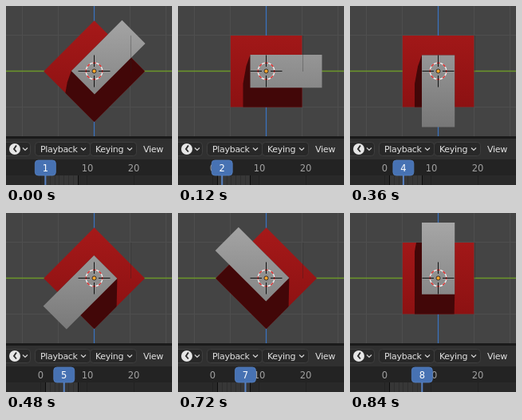
These frames come from a looping animation (208 px wide and 224 px high, 0.96 s). An HTML page:

```html
<!DOCTYPE html>
<html lang="en">
<head>
<meta charset="utf-8">
<title>Turning block</title>
<style>
html, body { margin: 0; width: 100%; height: 100%; overflow: hidden; background: #444; }
svg { display: block; width: 208px; height: 224px; }
text { font-family: "DejaVu Sans", sans-serif; font-size: 11.5px; fill: #a0a0a0; text-anchor: middle; }
.menu text { font-size: 11px; letter-spacing: -.3px; fill: #e2e2e2; text-anchor: start; }
</style>
</head>
<body>
<svg viewBox="0 0 208 224">
  <defs>
    <linearGradient id="red" gradientUnits="userSpaceOnUse" x1="0" y1="18" x2="0" y2="145">
      <stop stop-color="#a61919"/><stop offset="1" stop-color="#881011"/>
    </linearGradient>
    <linearGradient id="gray" gradientUnits="userSpaceOnUse" x1="0" y1="12" x2="0" y2="152">
      <stop stop-color="#a6a6a6"/><stop offset="1" stop-color="#777"/>
    </linearGradient>
    <clipPath id="face"><polygon id="faceClip"/></clipPath>
    <filter id="soft"><feGaussianBlur stdDeviation=".7"/></filter>
  </defs>

  <rect width="208" height="164" fill="#444"/>
  <path d="M20.5 0V163M65.5 0V163M155.5 0V163M200.5 0V163M0 36.5H208M0 126.5H208" stroke="#4e4e4e"/>
  <path d="M0 81.5H208" stroke="#6c962a" stroke-width="1.3"/>
  <path d="M110.5 0V163" stroke="#3b72bd" stroke-width="1.3"/>

  <polygon id="square" fill="url(#red)"/>
  <g clip-path="url(#face)"><polygon id="shadow" fill="#420708" filter="url(#soft)"/></g>
  <polygon id="bar" fill="url(#gray)"/>
  <path d="M156.5 37V82" stroke="#222" stroke-opacity=".3"/>

  <g fill="none">
    <circle cx="110.5" cy="81.5" r="10.3" stroke="#eee" stroke-width="1.3"/>
    <circle cx="110.5" cy="81.5" r="10.3" stroke="#d22" stroke-width="1.3" stroke-dasharray="4.045" stroke-dashoffset="2"/>
    <path d="M90.5 81.5H105M116 81.5H130.5M110.5 61.5V76M110.5 87V101.5" stroke="#111"/>
    <circle cx="110.5" cy="81.5" r="2.5" fill="#ffa52a" stroke="#222" stroke-width=".9"/>
  </g>

  <rect y="163" width="208" height="61" fill="#1a1a1a"/>
  <rect y="166" width="208" height="26" fill="#303030"/>
  <g class="menu">
    <g fill="#282828" stroke="#3e3e3e">
      <rect x="-6.5" y="170.5" width="37" height="17" rx="4"/>
      <rect x="36.5" y="170.5" width="69" height="17" rx="4"/>
      <rect x="105.5" y="170.5" width="58" height="17" rx="4"/>
    </g>
    <circle cx="11" cy="179" r="7" fill="#e6e6e6"/>
    <path d="M13 174.5L10 179L13 182.5" fill="none" stroke="#282828" stroke-width="1.8"/>
    <path id="chevrons" fill="none" stroke="#d0d0d0" stroke-width="1.2"/>
    <text x="43" y="183">Playback</text>
    <text x="112" y="183">Keying</text>
    <text x="172" y="183">View</text>
  </g>

  <rect y="192" width="208" height="32" fill="#232323"/>
  <rect y="212" width="208" height="12" fill="#292929"/>
  <rect x="50" y="212" width="40" height="12" fill="#373737"/>
  <path id="ticks" stroke="#222" stroke-opacity=".35"/>
  <path d="M43.5 212V224M101.5 212V224M160.5 212V224" stroke="#222"/>
  <path d="M49.5 212V224M90.5 212V224" stroke="#0c0c0c"/>
  <text x="43.5" y="207">0</text>
  <text x="102" y="207">10</text>
  <text x="160" y="207">20</text>
  <g id="playhead">
    <path d="M0 211V224" stroke="#5680c2" stroke-width="2"/>
    <rect x="-13" y="193" width="26" height="19" rx="4" fill="#4772b3" stroke="#5680c2" stroke-width=".8"/>
    <text id="count" y="207" style="fill:#fff"></text>
  </g>
</svg>
<script>
const $ = id => document.getElementById(id);
const STEP = 120, COUNT = 8, CX = 110.6, CY = 81.7;

const box = (l, t, r, b) => [[l, t], [r, t], [r, b], [l, b]];
const turn = (pts, a) => pts.map(([x, y]) => [
  CX + x * Math.cos(a) - y * Math.sin(a),
  CY + x * Math.sin(a) + y * Math.cos(a)
]);
const shift = (pts, dx, dy) => pts.map(([x, y]) => [x + dx, y + dy]);
const draw = (id, pts) =>
  $(id).setAttribute("points", pts.map(p => p.map(v => v.toFixed(2)).join()).join(" "));
const frameX = n => 43.5 + 5.85 * n;

function hull(pts) {
  const half = list => {
    const out = [];
    for (const p of list) {
      while (out.length > 1) {
        const [a, b] = out.slice(-2);
        if ((b[0] - a[0]) * (p[1] - a[1]) - (b[1] - a[1]) * (p[0] - a[0]) > 0) break;
        out.pop();
      }
      out.push(p);
    }
    return out.slice(0, -1);
  };
  const sorted = [...pts].sort((p, q) => p[0] - q[0] || p[1] - q[1]);
  return [...half(sorted), ...half(sorted.reverse())];
}

function pose(n) {
  const angle = n * Math.PI / 4;
  const square = turn(box(-44.8, -44.8, 44.8, 44.8), angle);
  const bar = turn(box(-20.6, -69.8, 20.6, 20.1), angle);
  draw("square", square);
  draw("faceClip", square);
  draw("bar", bar);
  // The light comes from above and slightly right.
  draw("shadow", hull([
    ...bar, ...shift(bar, -5, 14), ...shift(bar, -9, 36),
    ...shift(bar, -9, 90), ...shift(bar, -2, 90)
  ]));
  $("playhead").setAttribute("transform", `translate(${frameX(n)} 0)`);
  $("count").textContent = n;
}

$("chevrons").setAttribute("d",
  [24, 97, 155].map(x => `M${x - 3} 177.5l3 3l3 -3`).join(""));
$("ticks").setAttribute("d",
  Array.from({ length: COUNT }, (_, i) => `M${Math.floor(frameX(i + 1)) + .5} 212V224`).join(""));

let shown = 0;
const start = performance.now();
function tick() {
  const n = Math.floor((performance.now() - start) / STEP) % COUNT + 1;
  if (n !== shown) pose(shown = n);
  requestAnimationFrame(tick);
}
tick();
</script>
</body>
</html>
```
